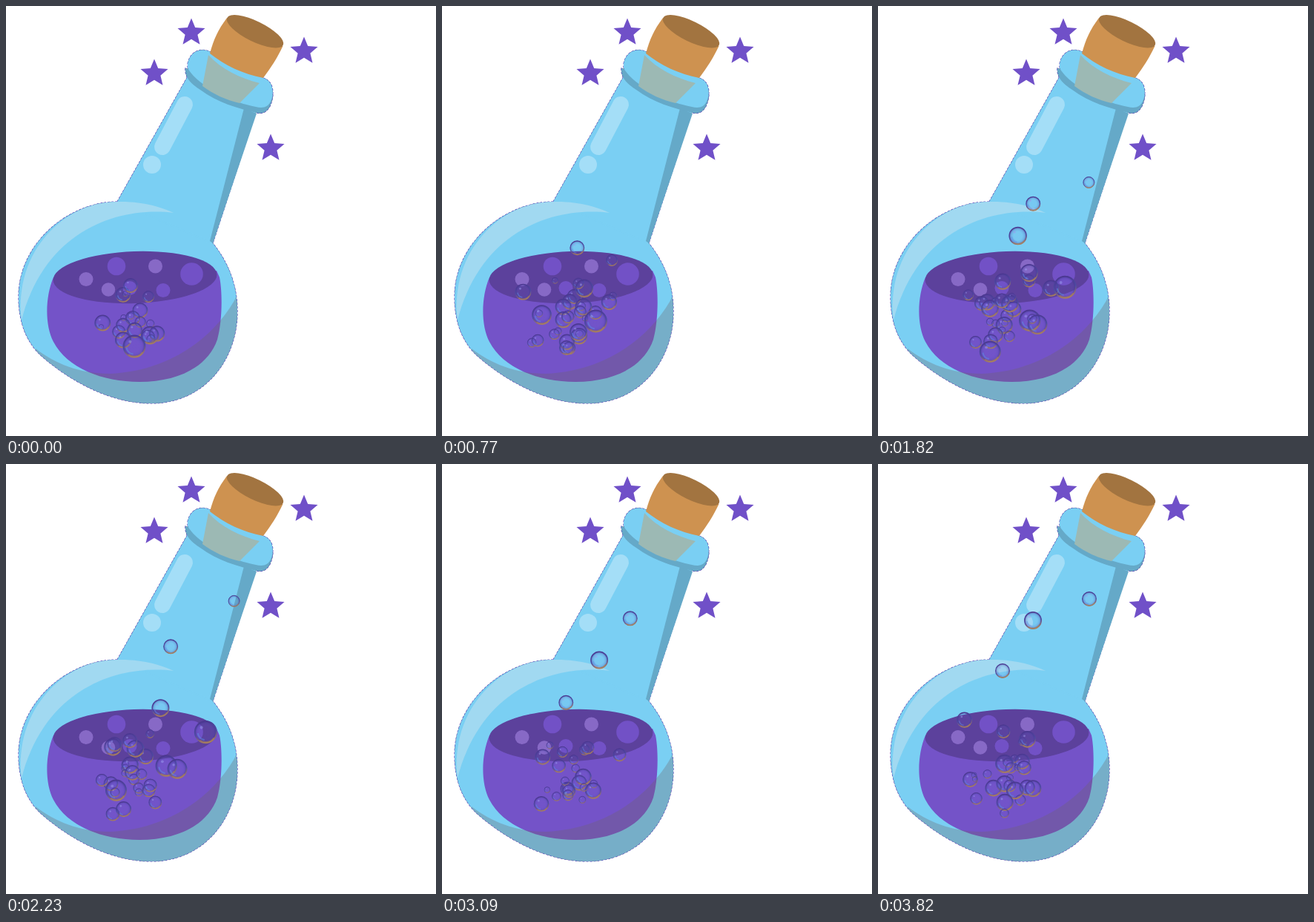
An HTML page that plays this animation: 580x580 px, repeating every 3.87 s.

```html
<!DOCTYPE html>
<html lang="en">
<head>
<meta charset="utf-8">
<title>Bubbling flask</title>
<style>
html, body { margin: 0; width: 100%; height: 100%; overflow: hidden; background: #fff; }
svg { display: block; width: 100vw; height: 100vh; }
</style>
</head>
<body>
<svg viewBox="0 0 580 580" xmlns="http://www.w3.org/2000/svg">
  <defs>
    <path id="body" d="M150 264C85 264 17 320 17 392C17 430 30 457 50 474C90 508 143 536 196 536C265 536 312 480 312 412C312 375 299 345 279 320Z"/>
    <path id="neck" d="M150 264L245 95L337 143L279 320Z"/>
    <path id="lip" d="M242 84C241 97 250 105 262 113C285 130 312 138 338 144C350 147 358 138 360 120Z"/>
    <path id="rim" d="M245 78C248 62 262 55 276 62L347 97C360 101 362 116 358 126C354 138 345 138 337 136C300 129 258 106 245 84Z"/>
    <clipPath id="inBody"><use href="#body"/></clipPath>
    <clipPath id="glass">
      <use href="#body"/><use href="#neck"/><use href="#lip"/><use href="#rim"/>
    </clipPath>
    <radialGradient id="film">
      <stop offset=".5" stop-color="#5060d8" stop-opacity=".06"/>
      <stop offset=".78" stop-color="#4a48b0" stop-opacity=".22"/>
      <stop offset="1" stop-color="#3c2c80" stop-opacity=".7"/>
    </radialGradient>
    <linearGradient id="edge" x1=".35" y1="0" x2=".6" y2="1">
      <stop offset="0" stop-color="#4b3790"/>
      <stop offset=".55" stop-color="#4d4ca4"/>
      <stop offset=".8" stop-color="#84667c"/>
      <stop offset="1" stop-color="#a8805c"/>
    </linearGradient>
    <g id="bubble">
      <circle r=".94" fill="url(#film)" stroke="url(#edge)" stroke-width=".12"/>
      <path d="M-.68 .1A.7 .7 0 0 0 -.1 .68" fill="none" stroke="#5f8fe8" stroke-opacity=".5" stroke-width=".14"/>
      <path d="M-.5 .72A.88 .88 0 0 0 .72 .5" fill="none" stroke="#b08458" stroke-opacity=".55" stroke-width=".14"/>
      <circle cx="-.36" cy="-.4" r=".13" fill="#9c9cf0" fill-opacity=".5"/>
    </g>
  </defs>

  <g stroke="#5a42b8" stroke-width="1.2" stroke-dasharray="3 2">
    <use href="#body"/><use href="#neck"/><use href="#lip"/><use href="#rim"/>
  </g>
  <g fill="#7acff3"><use href="#body"/><use href="#neck"/></g>
  <path d="M151 264L278 320" stroke="#7acff3" stroke-width="3"/>
  <path d="M321 138L338 145L279 320L275 317Z" fill="#65a9c8"/>
  <path d="M21 424C10 330 80 264 150 264C185 263 212 272 226 279C150 270 52 303 21 424Z" fill="#a1d9f1"/>
  <path d="M241 133L211 190" stroke="#a4def7" stroke-width="22" stroke-linecap="round"/>
  <circle cx="197" cy="214" r="12" fill="#a4def7"/>

  <path d="M64 366C53 392 52 430 64 453C82 488 130 507 180 507C232 507 272 487 285 450C292 425 292 385 288 366L284 357Z" fill="#7453c8"/>
  <ellipse cx="174" cy="366" rx="110.5" ry="35" transform="rotate(-2 174 366)" fill="#5c419c"/>
  <path d="M313 388C287 440 228 492 140 496C100 496 65 482 40 462L40 560L330 560Z" fill="rgb(109,100,104)" fill-opacity=".31" clip-path="url(#inBody)"/>
  <g fill="#7251c6">
    <circle cx="149" cy="351" r="12.3"/><circle cx="250.5" cy="361.5" r="15.3"/>
    <circle cx="212" cy="383.5" r="9.5"/><circle cx="167" cy="380.5" r="9.5"/>
  </g>
  <g fill="#8769c6">
    <circle cx="108" cy="368.5" r="9.5"/><circle cx="201.5" cy="351" r="9.5"/>
    <circle cx="138" cy="382.5" r="9.3"/>
  </g>

  <use href="#lip" fill="#65a9c8"/>
  <use href="#rim" fill="#7acff3"/>
  <path d="M273 66C290 85 315 97 342 104L315 131C297 127 280 119 265 108Z" fill="#9cb9b4"/>
  <path d="M298 16C286 32 280 45 275 64C295 80 320 92 347 97C358 82 366 70 373.5 54Z" fill="#ce9250"/>
  <ellipse cx="336" cy="34.3" rx="42" ry="13.8" transform="rotate(26 336 34.3)" fill="#a27440"/>

  <g id="stars" fill="#7050c8"></g>
  <g id="bubbles" clip-path="url(#glass)"></g>
</svg>
<script>
const LOOP = 3870, STEPS = 85, STEP = LOOP / STEPS;
const FIZZ = 96;

const rand = (i, k) => {
  const v = Math.sin(i * 12.9898 + k * 78.233) * 43758.5453;
  return v - Math.floor(v);
};
const between = (low, high, u) => low + (high - low) * u;

// The few bubbles that leave the liquid: radius, steps alive, where they start, are halfway, and end.
const risers = [
  { r: 10, first: 0, last: 84, from: [168, 377], mid: [212, 262], to: [285, 182] },
  { r: 8, first: 0, last: 57, from: [192, 392], mid: [256, 296], to: [329, 132] },
  { r: 12, first: 17, last: 84, from: [184, 440], mid: [209, 324], to: [209, 211] },
  { r: 15.5, first: 0, last: 58, from: [173, 459], mid: [231, 401], to: [286, 344] },
  { r: 10, first: 17, last: 84, from: [168, 461], mid: [167, 369], to: [168, 279] }
];

// The rest is born near the bottom and fans out while it rises and slows down.
function fizz(i) {
  const first = between(-20, STEPS, i / FIZZ);
  const life = between(12, 42, rand(i, 1));
  const from = [between(122, 200, rand(i, 2)), between(440, 474, rand(i, 3))];
  const dx = life * between(-1.3, 2.2, rand(i, 4));
  const dy = life * between(-3.4, -1.8, rand(i, 5));
  return {
    r: 3.5 + 8.5 * rand(i, 6) + (i % 9 ? 0 : 3),
    first, last: first + life, from,
    mid: [from[0] + dx * 0.5, from[1] + dy * 0.55],
    to: [from[0] + dx, from[1] + dy]
  };
}

const NS = "http://www.w3.org/2000/svg";
function add(parent, tag, attrs) {
  const el = document.createElementNS(NS, tag);
  for (const name in attrs) el.setAttribute(name, attrs[name]);
  return document.getElementById(parent).appendChild(el);
}

function star(cx, cy) {
  const points = Array.from({ length: 10 }, (_, i) => {
    const r = i % 2 ? 8.8 : 19.5, a = i * Math.PI / 5;
    return [cx + r * Math.sin(a), cy - r * Math.cos(a)].map(v => v.toFixed(1)).join();
  });
  add("stars", "polygon", { points: points.join(" ") });
}
[[250, 36], [200, 91], [402, 61], [357, 192]].forEach(p => star(...p));

const bubbles = [...Array.from({ length: FIZZ }, (_, i) => fizz(i)), ...risers]
  .map(b => ({ ...b, el: add("bubbles", "use", { href: "#bubble" }) }));

// Parabola that passes through the halfway point at u = 0.5.
function along({ from, mid, to }, u) {
  return from.map((a, k) => {
    const bend = mid[k] - (a + to[k]) / 2;
    return a + (to[k] - a) * u + bend * 4 * u * (1 - u);
  });
}

function place(b, step) {
  const seen = step >= b.first && step <= b.last;
  b.el.setAttribute("visibility", seen ? "visible" : "hidden");
  if (!seen) return;
  const [x, y] = along(b, (step - b.first) / (b.last - b.first));
  b.el.setAttribute("transform", `translate(${x.toFixed(2)} ${y.toFixed(2)}) scale(${b.r.toFixed(2)})`);
}

function draw(ms) {
  const step = Math.min(STEPS - 1, Math.floor((ms % LOOP + 5.5) / STEP));
  bubbles.forEach(b => place(b, step));
}

const start = performance.now();
function tick() {
  draw(performance.now() - start);
  requestAnimationFrame(tick);
}
tick();
</script>
</body>
</html>
```
